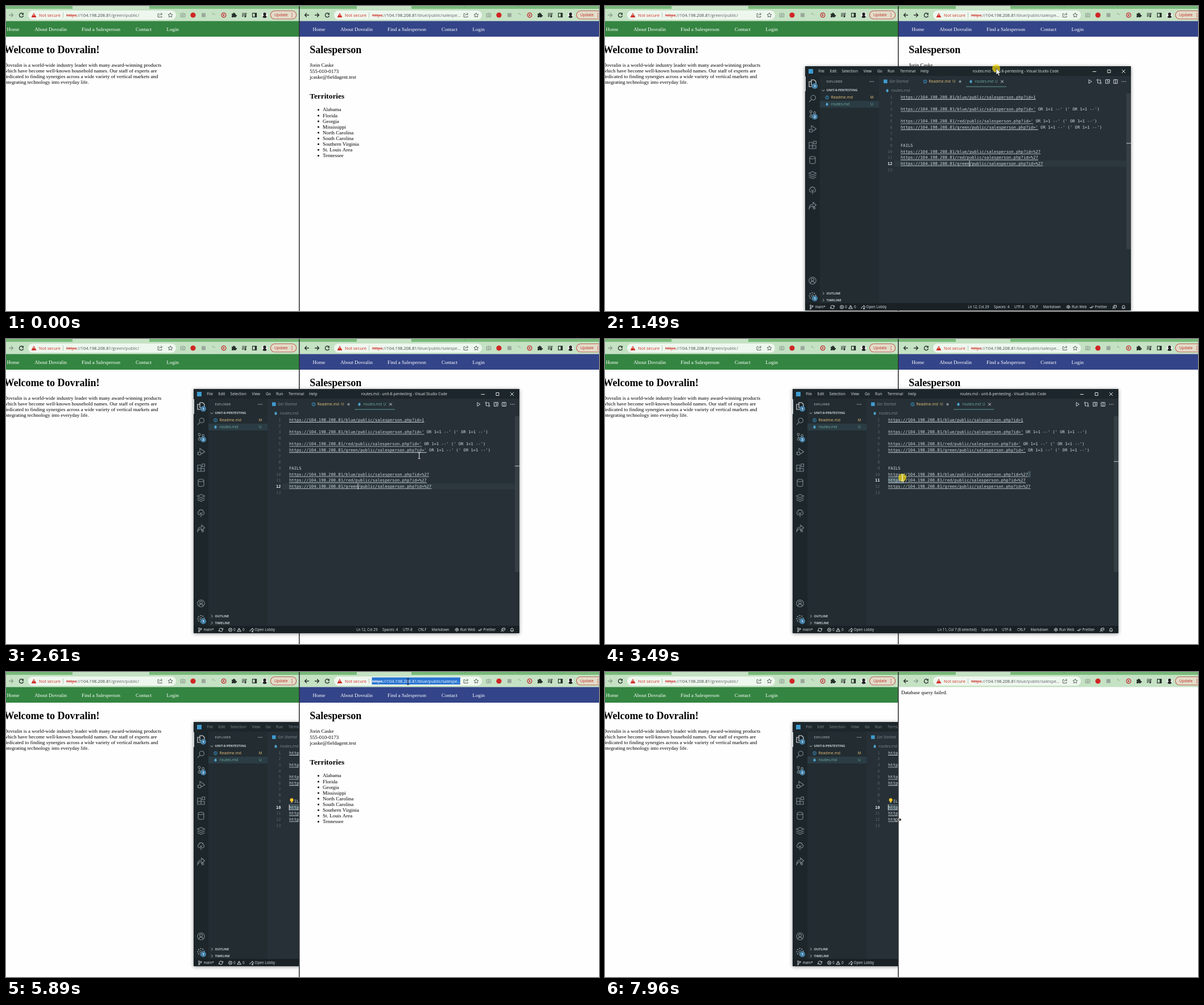
These frames come from a looping animation (1043 by 537 pixels, 8000 ms). An HTML page with a canvas:

```html
<!DOCTYPE html>
<html lang="en">
<head>
<meta charset="utf-8">
<title>Salesperson lookup</title>
<style>
  html, body { margin: 0; width: 100%; height: 100%; overflow: hidden; background: #fff; }
  canvas { display: block; }
</style>
</head>
<body>
<canvas width="1043" height="537"></canvas>
<script>
const c = document.querySelector('canvas').getContext('2d');
const LOOP = 8000;
const UI = '"Open Sans", sans-serif';
const SERIF = '"Liberation Serif", serif';
const MONO = '"DejaVu Sans Mono", monospace';

// Drawing helpers; text is placed by the middle of its capitals
function text(s, x, y, size, color, { face = UI, style = '', align = 'left' } = {}) {
  c.font = `${style} ${size}px ${face}`;
  c.fillStyle = color;
  c.textAlign = align;
  c.fillText(s, x, y + size * 0.35);
  return c.measureText(s).width;
}
function box(x, y, w, h, color, r = 0) {
  c.fillStyle = color;
  c.beginPath();
  c.roundRect(x, y, w, h, r);
  c.fill();
}
function disc(x, y, r, color) {
  c.fillStyle = color;
  c.beginPath();
  c.arc(x, y, r, 0, 7);
  c.fill();
}
function line(x, y, d, color, width = 1) {
  c.save();
  c.translate(x, y);
  c.strokeStyle = color;
  c.lineWidth = width;
  c.stroke(new Path2D(d));
  c.restore();
}
function shape(x, y, d, color) {
  c.save();
  c.translate(x, y);
  c.fillStyle = color;
  c.fill(new Path2D(d));
  c.restore();
}
const circle = (r, x = 0, y = 0) => `M${x + r} ${y}a${r} ${r} 0 1 1 ${-2 * r} 0a${r} ${r} 0 1 1 ${2 * r} 0`;

// Linear interpolation through [time, x, y] keys
function along(keys, t) {
  if (t <= keys[0][0]) return keys[0].slice(1);
  for (let i = 1; i < keys.length; i++) {
    const [t0, x0, y0] = keys[i - 1], [t1, x1, y1] = keys[i];
    if (t <= t1) {
      const k = (t - t0) / (t1 - t0);
      return [x0 + (x1 - x0) * k, y0 + (y1 - y0) * k];
    }
  }
  return keys.at(-1).slice(1);
}

const WINDOW_PATH = [[1200, 860, 8], [1250, 728, 33], [1300, 613, 55], [1350, 500, 79], [1400, 420, 97],
  [1460, 352, 106], [1510, 342, 108], [1660, 342, 108], [1710, 341, 107], [1860, 335, 101], [1960, 330, 88]];
const POINTER_PATH = [[1200, 1060, 45], [1250, 949, 62], [1300, 826, 77], [1350, 745, 92], [1400, 700, 106],
  [1510, 678, 113], [1660, 678, 113], [1710, 677, 112], [1860, 671, 99], [1960, 666, 93], [2110, 666, 93],
  [2760, 745, 239], [2910, 745, 239], [3310, 590, 244.5], [3460, 523, 244], [3710, 505, 244], [3960, 490, 239],
  [4310, 490, 239], [4960, 722, 34], [5110, 722, 34], [5260, 707, 17], [7810, 707, 17], [7960, 516, 260]];
const RAISE = 5350, SELECT_URL = 5890, PASTE = 6260, ENTER = 7020, LOADED = 7180;

// ---------- Browser ----------
const HOST = '104.198.208.81';
const URL_GREY = '#5f6368', RED = '#cf2e26', INK = '#26302a';

function toolbar(path, tab, width, forward, selected) {
  box(-30, 0, width + 60, 6, '#78ba79');
  box(tab[0], -4, tab[1] - tab[0], 12, '#c5e2c4', 3);
  box(-30, 5, width + 60, 21.5, '#c5e2c4');
  line(-9, 16, 'M4 0H-3.5M0 -3.5L-3.5 0L0 3.5', INK, 1.3);
  line(9, 16, 'M-4 0H3.5M0 -3.5L3.5 0L0 3.5', forward, 1.3);
  line(27, 16, 'M2.6 -2.4A3.6 3.6 0 1 0 3.5 1', INK, 1.3);
  shape(27, 16, 'M4 -4.3V-.6H.4Z', INK);
  box(39, 8, 260, 16, '#eef7ee', 8);
  shape(49, 16, 'M0 -4L4.5 4H-4.5Z', RED);
  box(48.6, 14, 0.9, 3, '#fff');
  text('Not secure', 58, 16, 7.5, RED);
  box(100, 11.5, 0.8, 9, '#a9b8a9');
  if (selected) box(105.5, 9.5, 155.5, 12.5, '#2b76d2');
  const schemeWidth = text('https', 106, 16, 7.5, selected ? '#fff' : RED);
  box(106, 16.2, schemeWidth, 0.8, selected ? '#fff' : RED);
  let x = 106 + schemeWidth;
  x += text('://', x, 16, 7.5, selected ? '#fff' : URL_GREY);
  x += text(HOST, x, 16, 7.5, selected ? '#fff' : '#3f4448');
  text(path, x, 16, 7.5, selected ? '#fff' : URL_GREY);
  line(271, 16, 'M-1.5 -2.5H-3.8V3.5H3V1.5M-1.5 1C-1 -1 .5 -1.8 3 -1.8M1.4 -4L3.8 -1.8L1.4 .2', '#4d5650', 0.9);
  line(289, 16, 'M0 -4L1.2 -1.3L4 -1L1.9 .9L2.5 3.7L0 2.2L-2.5 3.7L-1.9 .9L-4 -1L-1.2 -1.3Z', '#4d5650', 0.9);
  line(311, 16, 'M-3.8 -2.5H-1.7L-1 -3.5H1L1.7 -2.5H3.8V3.2H-3.8Z' + circle(1.5, 0, 0.3), '#87948a', 1);
  disc(329, 16, 4.6, '#d02525');
  box(344, 12.5, 7, 7, '#9aa79c');
  disc(364, 13.5, 0.9, '#83917f');
  disc(367, 15, 0.7, '#83917f');
  line(383, 16, circle(3.9), '#c4262e', 1.2);
  shape(383, 16, 'M-1.3 -2L2 0L-1.3 2Z', '#c4262e');
  shape(401, 16, 'M-4 -2.4H-1.4A1.4 1.4 0 1 1 1.2 -2.4H3V0A1.4 1.4 0 1 1 3 2.3V4H.8A1.4 1.4 0 0 0 -1.6 4H-4V1.6A1.3 1.3 0 0 0 -4 -.6Z', INK);
  line(419, 16, 'M-4 -3H2M-4 -.4H2M-4 2.2H-1M2.8 2.4V-3H4.6', INK, 1.2);
  disc(420.8, 18.4, 1.5, INK);
  line(437, 16, 'M-3.5 -3.3H3.5V3.3H-3.5Z', INK, 1.2);
  box(437.6, 12.5, 3.2, 7, INK);
  disc(455, 16, 5, '#fafafa');
  disc(455, 14.2, 2.7, '#222');
  shape(455, 16, 'M-3.6 3.4A3.7 3.7 0 0 1 3.6 3.4A5 5 0 0 1 -3.6 3.4Z', '#222');
  box(465, 8.2, 46, 15, '#c03a31', 7.5);
  box(465.8, 9, 44.4, 13.4, '#e2dcc9', 6.7);
  text('Update', 472, 16, 6.9, '#bd2a22');
  for (const y of [13, 16, 19]) disc(503, y, 0.8, '#bd2a22');
}

function nav(color) {
  box(-30, 26.5, 600, 27.5, color);
  const items = { Home: 1.5, 'About Dovralin': 50.3, 'Find a Salesperson': 133, Contact: 228, Login: 282.5 };
  for (const s in items) text(s, items[s], 41, 9, '#fff', { face: SERIF });
}
const serif = (s, x, y, size = 9, style = '') => text(s, x, y, size, '#000', { face: SERIF, style });

function leftBrowser() {
  box(0, 0, 516, 537, '#fefefe');
  toolbar('/green/public/', [117, 252], 516, '#8b9c8c', false);
  nav('#348541');
  serif('Welcome to Dovralin!', -3.5, 77, 18, 'bold');
  ['Dovralin is a world-wide industry leader with many award-winning products',
   'which have become well-known household names. Our staff of experts are',
   'dedicated to finding synergies across a wide variety of vertical markets and',
   'integrating technology into everyday life.'].forEach((s, i) => serif(s, -3.5, 104 + 10.1 * i));
}

function globe(x, y) {
  disc(x, y, 3.7, '#5c6166');
  line(x, y, 'M-2.8 -1.2L-.4 -.2L-1 2.4M.4 -3L1 -1L3 -.5M1 2.8L1.6 1L3 .8', '#fff', 0.9);
}

function suggestions(t) {
  const address = `https://${HOST}/blue/public/salesperson.php?id`;
  const blue = '#2456b8';
  c.save();
  c.shadowColor = 'rgba(0,0,0,.35)';
  c.shadowBlur = 7;
  c.shadowOffsetY = 2;
  box(573.5, 6, 266.5, 88.5, '#fff', 5);
  c.restore();
  box(573.5, 26, 266.5, 21, '#e7e8ea');
  box(573.5, 26, 2, 21, '#2b6fd6', 1);
  const w = text(address + '=%27', 602, 16, 7.5, URL_GREY);
  if (t < 6770) box(602 + w + 0.3, 10, 0.8, 11, '#222');
  text(address + '...', 602, 36.5, 7.5, blue, { style: 'bold' });
  text(address + '=%27', 602, 58, 7.5, URL_GREY);
  text(address + '=%27...', 602, 79, 7.5, blue, { style: 'bold' });
  for (const y of [16, 36.5, 79]) globe(587, y);
  line(587, 58, circle(2.2, -0.8, -0.8) + 'M.8 .8L3.4 3.4', URL_GREY, 1);
  line(829, 36.5, 'M-2.5 -2.5L2.5 2.5M2.5 -2.5L-2.5 2.5', '#333', 1.1);
}

function rightBrowser(t) {
  const loaded = t >= LOADED;
  c.save();
  c.beginPath();
  c.rect(515, 0, 528, 537);
  c.clip();
  box(515, 0, 528, 537, '#fefefe');
  c.save();
  c.translate(538, 0);
  toolbar('/blue/public/salespe...', [79, 175], 510, loaded ? '#8b9c8c' : INK, t >= SELECT_URL && t < PASTE);
  if (!loaded) nav('#334488');
  c.restore();
  for (const x of [807, 901]) box(x, 0, 0.8, 2, '#5a925b');
  if (loaded) {
    serif('Database query failed.', 521, 36);
  } else {
    serif('Salesperson', 534.3, 77, 18, 'bold');
    ['Jorin Caske', '555-010-0173', 'jcaske@fieldagent.test'].forEach((s, i) => serif(s, 534.3, 104.3 + 10.1 * i));
    serif('Territories', 534.3, 158.5, 13.3, 'bold');
    ['Alabama', 'Florida', 'Georgia', 'Mississippi', 'North Carolina', 'South Carolina',
     'Southern Virginia', 'St. Louis Area', 'Tennessee'].forEach((s, i) => {
      serif(s, 557, 182.3 + 10.08 * i);
      disc(549.5, 182.8 + 10.08 * i, 1.5, '#000');
    });
  }
  if (t >= PASTE && t < ENTER) suggestions(t);
  box(515, 0, 1.6, 537, '#303236');
  c.restore();
}

// ---------- Editor ----------
const CHAR = 4.32, ROW = 10.65, CODE_X = 168;
const rowY = n => 54.3 + (n - 1) * ROW;
const page = color => `https://${HOST}/${color}/public/salesperson.php?id=`;
const INJECT = "' OR 1=1 --' (' OR 1=1 --')";
const CODE = [page('blue') + 1, '', page('blue') + INJECT, '', page('red') + INJECT, page('green') + INJECT,
  '', '', 'FAILS', page('blue') + '%27', page('red') + '%27', page('green') + '%27', ''];
const DIM = '#7d8b91', PALE = '#dfe6e9', YELLOW = '#e8c07a', TEAL = '#6fb0a4', ACCENT = '#3f9bd0';

// Caret and selection follow the pointer while it drags back from the end of row 10
function caretAt(t, q) {
  if (t < 2930) return { row: 12, col: 29, count: 0 };
  const [x, y] = along(POINTER_PATH, Math.min(q, 3960));
  const row = y >= 243.4 ? 11 : 10;
  const col = Math.max(1, Math.min(58, Math.round((x - 498) / CHAR) + 1));
  return { row, col, count: row === 10 ? 58 - col : col + 1 };
}

function code(t, { row, col, count }) {
  const select = (n, from, to) =>
    box(CODE_X + (from - 1) * CHAR, rowY(n) - ROW / 2, (to - from) * CHAR, ROW, '#43565f');
  if (!count) box(156, rowY(row) - ROW / 2, 409, ROW, '#2c383e');
  else if (row === 10) select(10, col, 58);
  else {
    select(10, 58, 59);
    select(11, 1, col);
  }
  CODE.forEach((s, i) => {
    const y = rowY(i + 1), current = i + 1 === row;
    text(i + 1, 153.5, y, 7, current ? '#eef3f5' : '#56656c',
      { face: MONO, align: 'right', style: current ? 'bold' : '' });
    text(s, CODE_X, y, 7.18, '#ccd7db', { face: MONO });
    const link = s.match(/^https\S+/);
    if (link) box(CODE_X, y + 3.8, link[0].length * CHAR, 0.8, '#ccd7db');
  });
  const blinkOn = Math.floor((t - 1220) / 500) % 2 === 0;
  if (t >= 2930 || blinkOn) box(CODE_X + (col - 1) * CHAR - 0.3, rowY(row) - 5, 0.9, 10, '#f4f4f4');
  if (t >= 4110) {
    box(168, 133, 8.6, 10.5, '#263036');
    disc(172.5, 137.3, 3, '#ffc928');
    box(171, 139.5, 3, 2, '#e0a826');
    box(171.2, 141.3, 2.6, 1.2, '#9aa4a8');
  }
  box(565, 48, 8, 274, 'rgba(255,255,255,.07)');
  box(565, 39 + 8 * row, 8, 1.2, '#a9b4b8');
}

function badge(y, s) {
  disc(17, y, 5, '#4480a8');
  text(s, 17, y, 5.4, '#fff', { align: 'center', style: 'bold' });
}
const info = (x, y) => {
  line(x, y, circle(2.9), ACCENT, 0.9);
  box(x - 0.4, y - 0.6, 0.9, 2.3, ACCENT);
  box(x - 0.4, y - 1.9, 0.9, 0.9, ACCENT);
};
const markdown = (x, y) => shape(x, y, 'M-1.6 -3L0 -2L1.6 -3V0H3L0 3.3L-3 0H-1.6Z', '#4fa3cf');
const chevron = (x, y, open) => line(x, y, open ? 'M-2.3 -1L0 1.3L2.3 -1' : 'M-1 -2.3L1.3 0L-1 2.3', '#bcc7cb', 0.9);

function activityBar() {
  box(0, 17, 26, 400, '#1d262a');
  box(0, 18, 1, 26, PALE);
  line(13, 30, 'M-2 -6H3L6 -3V3H-2ZM-2 -3H-6V6H2V3', PALE, 1.1);
  [[57, circle(4.2, 1.3, -1.5) + 'M-1.8 1.6L-6 6'],
   [84, circle(1.9, -3, -4) + circle(1.9, -3, 4.4) + circle(1.9, 3.6, -2) + 'M-3 -2V2.4M3.6 0C3.6 2-1 1-3 2.4'],
   [110.5, 'M-2 -1V-6L6.5 0L1 3.8' + circle(2.7, -2.6, 3) + 'M-6.5 1L-5 2M-6.5 5L-5 4.3'],
   [138, 'M-6 -4H0V2H6V7H-6ZM-6 2H0V7M2 -6H6.5V-1.3H2Z'],
   [165, 'M-5 -4A5 2.2 0 0 1 5 -4V4.5A5 2.2 0 0 1 -5 4.5ZM-5 -4A5 2.2 0 0 0 5 -4'],
   [191.5, 'M0 -6L6.5 -3L0 0L-6.5 -3ZM-6.5 .2L0 3.2L6.5 .2M-6.5 3.4L0 6.4L6.5 3.4'],
   [218.5, 'M-1 3H-3A3.3 3.3 0 0 1 -4 -3A4.2 4.2 0 0 1 4 -3A3.3 3.3 0 0 1 3 3H1M0 7V0M-2.3 -.8L0 1.5L2.5 -1.5'],
   [245, 'M-6 6C-6 0-3 -2 1 -2V-5.5L6.5 -.5L1 4V1C-2 1-4 2-6 6Z' + circle(1.6, 3, 5)],
   [377.5, circle(6.2) + circle(2.3, 0, -1.7) + 'M-4 4.5C-3 .5 3 .5 4 4.5'],
  ].forEach(([y, d]) => line(13, y, d, DIM, 1.1));
  line(13, 404.5, circle(2), DIM, 1.1);
  c.setLineDash([2.2, 1.8]);
  line(13, 404.5, circle(5.6), DIM, 2);
  c.setLineDash([]);
  badge(35, '1');
  badge(89, '2');
  badge(409, '1');
}

function sidebar() {
  box(26, 17, 104, 400, '#222c31');
  text('EXPLORER', 37.5, 27, 5.8, '#b4bfc4');
  for (const x of [114, 117, 120]) disc(x, 27, 0.7, PALE);
  chevron(32, 42.5, true);
  text('UNIT-8-PENTESTING', 37.5, 42.5, 5.6, '#c5d0d4', { style: 'bold' });
  info(38.5, 55);
  text('Readme.md', 45.5, 55, 6.8, YELLOW);
  text('M', 114.5, 55, 6.4, YELLOW);
  box(26, 61, 104, 12, '#2b3c44');
  markdown(38.5, 67);
  text('routes.md', 45.5, 67, 6.8, TEAL);
  text('U', 115, 67, 6.4, TEAL);
  ['OUTLINE', 'TIMELINE'].forEach((s, i) => {
    chevron(32, 400 + 12 * i);
    text(s, 37.5, 400 + 12 * i, 5.6, '#c5d0d4', { style: 'bold' });
  });
}

function tabs() {
  box(138, 23.5, 6.5, 6.5, ACCENT);
  text('Get Started', 148, 27, 6.8, DIM, { style: 'italic' });
  info(211, 27);
  text('Readme.md', 217.5, 27, 6.8, YELLOW);
  text('M', 259, 27, 6.4, '#b09a6c');
  disc(272.5, 27, 2.2, '#78868c');
  markdown(291.5, 27);
  text('routes.md', 298.5, 27, 6.8, TEAL);
  text('U', 334, 27, 6.4, TEAL);
  line(346.5, 27, 'M-2.3 -2.3L2.3 2.3M2.3 -2.3L-2.3 2.3', PALE, 0.9);
  box(283, 35.6, 71, 1, '#5d9a9a');
  markdown(144.5, 43);
  text('routes.md', 151.5, 43, 6.8, DIM);
  line(501, 27, 'M-2 -3.3L3 0L-2 3.3Z', PALE, 0.9);
  line(517, 27, circle(1.3, -2.5, -2.7) + circle(1.3, 2.5, 2.7) + 'M-2.5 -1.4V2.7H0M2.5 1.4V-2.7H0', PALE, 0.9);
  line(532, 27, 'M-3.5 -3.3H3.5V0M-3.5 -3.3V3.3H0M0 -3.3V0' + circle(1.7, 1.7, 1.7), PALE, 0.9);
  line(546, 27, 'M-3.3 -3.3H3.3V3.3H-3.3ZM0 -3.3V3.3', PALE, 0.9);
  for (const x of [557.5, 560.5, 563.5]) disc(x, 27, 0.7, PALE);
}

function statusBar({ row, col, count }) {
  box(0, 417, 573, 13, '#192125');
  const y = 424, put = (s, x, align) => text(s, x, y, 6.3, PALE, { align });
  const icon = (x, d) => line(x, y, d, PALE, 0.9);
  icon(11, circle(1.1, -1.5, -2.5) + circle(1.1, -1.5, 2.7) + circle(1.1, 2, -1.5) + 'M-1.5 -1.4V1.6M2 -.4C2 1-1 .5-1.5 1.6');
  put('main*', 17.5);
  icon(48, 'M-3 -.5A3 3 0 0 1 2.8 -1M3 .5A3 3 0 0 1 -2.8 1M1.4 -.8H3.6V-2.8M-1.4 .8H-3.6V2.8');
  icon(64.5, circle(3) + 'M-1.3 -1.3L1.3 1.3M1.3 -1.3L-1.3 1.3');
  put('0', 70);
  icon(80, 'M0 -3L3.3 2.8H-3.3ZM0 -1V1');
  put('0', 86);
  icon(102, 'M-3 3C-3 0-1 -1 1 -1V-3L4 -.2L1 2.3V.8' + circle(1, 1.5, 3));
  put('Open Lobby', 107.5);
  put(`Ln ${row}, Col ${col}` + (count ? ` (${count} selected)` : ''), 323.5, 'right');
  const items = { 'Spaces: 4': 332, 'UTF-8': 368, CRLF: 395, Markdown: 418.5, 'Run Web': 469, Prettier: 509.5 };
  for (const s in items) put(s, items[s]);
  icon(463, circle(1) + 'M-2 2A2.8 2.8 0 1 1 2 2M0 1V3.5');
  icon(504, 'M-3.5 0L-2 2L1 -2M-.6 1.2L0 2L3.5 -2');
  icon(544, circle(1.5, -1, -.5) + 'M-3.5 3.5C-3 1 1 1 1.5 3.5M-1 -3H3.5V.5H1.7');
  icon(560, 'M-2.8 2H2.8L2 .8V-.8A2 2 0 0 0 -2 -.8V.8ZM-.8 3H.8');
}

function editor(t, q) {
  const caret = caretAt(t, q);
  const [x, y] = along(WINDOW_PATH, q);
  const ink = t < RAISE ? PALE : '#7c888d';
  c.save();
  c.translate(Math.round(x), Math.round(y));
  c.save();
  c.shadowColor = 'rgba(0,0,0,.45)';
  c.shadowBlur = 6;
  c.shadowOffsetY = 1;
  box(0, 0, 573, 430, '#263036');
  c.restore();
  box(0, 0, 573, 17, '#1d262a');
  box(6, 5, 8, 8, ACCENT);
  const menu = { File: 23.3, Edit: 43.5, Selection: 64.5, View: 102.5, Go: 127, Run: 145, Terminal: 167, Help: 203 };
  for (const s in menu) text(s, menu[s], 9, 6.7, ink);
  text('routes.md - unit-8-pentesting - Visual Studio Code', 294.5, 9, 6.55, ink);
  line(509, 9, 'M-3.5 .5H3', ink);
  line(534.5, 9, 'M-2.5 -2.5H2.5V2.5H-2.5Z', ink);
  line(560, 9, 'M-3 -3L3 3M3 -3L-3 3', ink);
  activityBar();
  sidebar();
  tabs();
  code(t, caret);
  statusBar(caret);
  c.restore();
}

// ---------- Pointer ----------
function pointer(t, q) {
  const [x, y] = along(POINTER_PATH, q);
  const pressed = t < 1960 || (t >= 2930 && t < 3960) || (t >= RAISE && t < 5450);
  if (pressed) disc(x, y, 7, 'rgba(246,220,10,.7)');
  const overCode = t < RAISE && x > 460 && x < 895 && y > 137 && y < 505;
  if (t >= 7960) {
    line(x, y, 'M-4 0H4M-2 -2L-4.5 0L-2 2M2 -2L4.5 0L2 2', '#fff', 2.4);
    line(x, y, 'M-4 0H4M-2 -2L-4.5 0L-2 2M2 -2L4.5 0L2 2', '#111', 1.1);
  } else if (y < 26 || overCode) {
    line(x, y, 'M-2 -5.3H-.6L0 -4.7L.6 -5.3H2M0 -4.7V4.7M-2 5.3H-.6L0 4.7L.6 5.3H2', overCode ? '#f5f5f5' : '#111', 1);
  } else {
    const arrow = 'M0 0V11.3L2.6 8.9L4.4 13L6.2 12.2L4.5 8.2H8Z';
    shape(x, y, arrow, '#fff');
    line(x, y, arrow, '#222', 0.7);
  }
}

function draw(now) {
  const t = now % LOOP;
  const q = t < 1450 ? Math.floor(t / 50) * 50 : Math.floor((t - 10) / 50) * 50 + 10; // 20 steps a second
  c.clearRect(0, 0, 1043, 537);
  leftBrowser();
  if (t >= RAISE) editor(t, q);
  rightBrowser(t);
  if (t >= 1200 && t < RAISE) editor(t, q);
  if (t >= 1200) pointer(t, q);
}

const start = performance.now();
function tick() {
  draw(performance.now() - start);
  requestAnimationFrame(tick);
}
tick();
</script>
</body>
</html>
```
